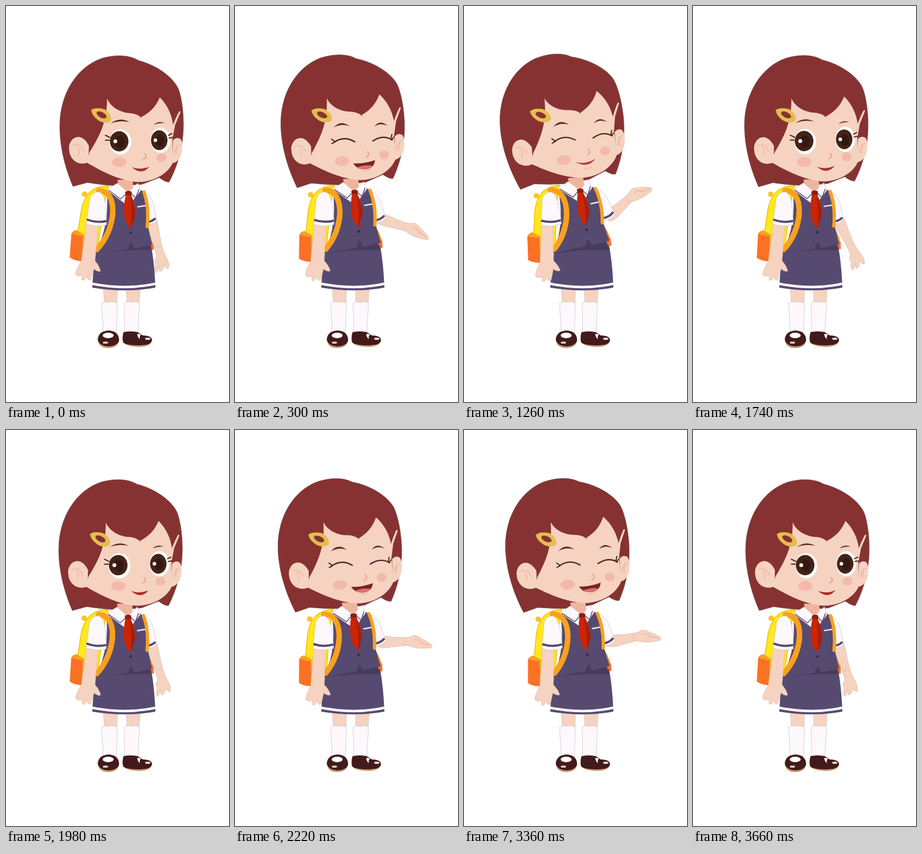
Write an HTML page that moves like this. It is 406 px wide and 720 px high and loops after 3.72 s.

```html
<!DOCTYPE html>
<html lang="en">
<head>
<meta charset="utf-8">
<title>Schoolgirl</title>
<style>
html, body { margin: 0; width: 100%; height: 100%; overflow: hidden; background: #fff; }
svg { display: block; width: 406px; height: 720px; }
.skin { fill: #f5d3c0; }
.limb { stroke: #d3b6a6; stroke-width: .6; }
.hair { fill: #873232; }
.navy { fill: #564a70; }
.white { fill: #fcf8fb; stroke: #c4bec6; stroke-width: .7; }
.line { fill: none; stroke-linecap: round; stroke-linejoin: round; }
.fold { stroke: #eeb5a1; stroke-width: 1.5; }
.lash { stroke: #4a241d; stroke-width: 2; }
.lid { stroke: #4a241d; stroke-width: 2.4; }
.trim { stroke: #564a70; stroke-width: 4; stroke-linecap: butt; }
</style>
</head>
<body>
<svg viewBox="0 0 406 720">
  <g class="head">
    <path class="hair" stroke="#6b4a45" stroke-width=".8" d="M122 328C112 305 97 262 98 215C99 158 130 110 175 95C200 88 225 89 241 99C272 107 302 127 313 149C318 160 323 185 323 215C323 250 315 286 297 320Q291 321 279 312L248 324L205 327Q178 326 148 321Z"/>
  </g>

  <g id="legs">
    <path class="skin limb" d="M177 510H203L202 542H179ZM219 510H245L242 542H220Z"/>
    <path class="white" d="M174 540Q180 536 185 539Q194 536 203 540L201 594Q190 598 177 594ZM215 540Q222 536 228 539Q236 536 243 540L240 594Q228 598 216 594Z"/>
    <path fill="#c79a70" d="M168 609Q169 622 187 622Q204 621 206 608ZM213 610Q216 619 244 620Q264 619 266 608Z"/>
    <path fill="#431a1b" d="M167 607Q168 591 187 590Q205 591 206 607Q204 618 187 619Q170 618 167 607ZM214 593Q227 590 240 593L249 599Q265 599 266 607Q265 617 244 617Q217 617 213 611Q211 602 214 593Z"/>
    <ellipse fill="#fff" cx="186" cy="599" rx="10" ry="5"/>
    <ellipse fill="#d8c9c5" cx="181" cy="612" rx="5" ry="2"/>
    <path fill="#fff" d="M239 596L246 597Q242 601 244 606Q239 602 239 596Z"/>
    <ellipse fill="#e9dfdc" cx="258" cy="605" rx="5" ry="2"/>
  </g>

  <g class="side">
    <circle cx="143" cy="342" r="5" fill="#f9c720"/>
    <path fill="#ffe81d" stroke="#f5b91c" stroke-width="1.5" d="M187 327C158 327 143 341 137 372L130 416L138 464H163L182 342Z"/>
    <path fill="#d5b024" d="M160 395L162 463Q148 467 134 463L143 415Z"/>
    <path fill="#fb7124" d="M127 408L141 415L137 464Q124 463 116 457L119 414Q122 409 127 408Z"/>
    <path fill="#f9a11f" d="M128 407L141 415L138 419L120 414Z"/>
  </g>

  <g class="body">
    <path fill="#f6911f" d="M254 398Q270 420 269 443L256 446Z"/>
    <path fill="#fb7124" d="M263 426L269 430V443H262Z"/>
    <g id="upper">
      <g id="fore">
        <path class="skin limb" d="M-8 -9Q5 -11 24 -8L56 -6V7L20 10Q2 13 -8 8Z"/>
        <path id="restHand" class="skin limb" d="M48 -6L66 -8Q86 -13 91 -7Q91 -3 83 -1Q96 5 92 10L82 8Q95 14 92 18Q84 18 78 13Q70 16 65 8L48 7Z"/>
        <g id="palm">
          <path class="skin limb" d="M-6 -6Q2 -7 7 -12Q16 -14 23 -9Q34 -7 42 -2Q46 3 40 5L22 9Q6 10 -6 7Z"/>
          <path class="line fold" d="M10 -5Q19 -7 25 -2M23 -1L39 0"/>
        </g>
      </g>
      <path class="white" d="M242 336Q261 338 268 358L274 391Q264 400 249 397L242 366Z"/>
      <path class="line trim" d="M249 393Q264 394 272 386"/>
    </g>
  </g>

  <path class="navy" d="M166 440L264 435Q270 465 272 512Q217 522 157 512Q159 470 166 440Z"/>
  <path class="line" stroke="#fcf8fb" stroke-width="4.5" d="M157 505Q217 517 272 505"/>
  <path fill="#463d5e" d="M164 444L205 424H258L265 444Q215 442 164 450Z"/>

  <g class="body">
    <path fill="#efb59c" d="M203 316H231V336L222 345L206 335Z"/>
    <path class="navy" d="M183 335L207 331L222 352L238 331L252 338Q260 368 258 398L266 434L234 441L228 428L221 442Q190 445 161 452L175 420Q188 380 183 335Z"/>
    <path class="white" d="M183 334L203 322L222 339L240 322L245 336L223 364Z"/>
    <path class="line" stroke="#564a70" stroke-width="1.5" d="M187 335L209 351L217 343M229 342L236 349L242 334"/>
    <path fill="#8d1c12" d="M217 338Q223 334 229 338L228 348H218Z"/>
    <path fill="#c92508" d="M218 344H228Q235 360 236 378L227 405Q216 394 215 378Q214 360 218 344Z"/>
    <path fill="#a91c0a" d="M226 346Q237 368 235 382L227 405Q231 370 226 346Z"/>
    <circle cx="227" cy="412" r="2.5" fill="#3e2930"/>
    <path class="line" stroke="#eee8ef" stroke-width="2.5" d="M240 365L254 363"/>
    <path class="line" stroke="#f9a11f" stroke-width="6" d="M251 338Q261 365 257 401"/>
    <path class="line" stroke="#f9a11f" stroke-width="10" stroke-linecap="butt" d="M169 336C205 335 202 405 165 443"/>
  </g>

  <g class="side">
    <path class="skin limb" d="M147 394L168 397L162 463Q171 474 172 482Q167 484 160 478L154 497Q149 502 147 491Q143 501 138 498L138 490Q130 493 126 487Q130 473 137 464Z"/>
    <path class="white" d="M153 350Q158 337 170 338Q184 343 183 398Q165 403 146 396Z"/>
    <path class="line trim" d="M147 388Q165 395 183 391"/>
  </g>

  <g class="head">
    <path class="skin" d="M184 168C190 183 207 194 228 195Q247 198 249 210L246 202C262 194 273 183 280 166C294 180 302 198 304 216Q309 203 315 192Q319 190 317 195L308 216L303 242L304 284C296 304 270 320 240 320C205 318 170 298 146 284L152 266C168 240 184 214 184 168Z"/>
    <path class="skin" d="M150 284Q137 290 125 282Q113 272 115 254Q119 238 133 238Q143 239 151 254ZM304 244Q311 237 318 242Q323 250 320 266Q316 283 303 286Z"/>
    <path class="line fold" d="M122 253Q136 248 141 264M130 256Q136 265 131 272M318 252Q309 252 307 268M313 256Q309 262 311 269"/>
    <path fill="#e3bd51" d="M155 189Q164 183 180 188Q194 198 191 209Q182 216 168 208Q156 199 155 189Z"/>
    <ellipse class="hair" cx="174" cy="198" rx="10" ry="5" transform="rotate(28 174 198)"/>
    <ellipse fill="#f3baa9" cx="206" cy="284" rx="13" ry="9"/>
    <ellipse fill="#f3baa9" cx="283" cy="276" rx="9" ry="8"/>
    <path class="line" stroke="#eaa08c" stroke-width="2" d="M253 269Q259 275 250 279"/>

    <g id="open">
      <path fill="#5d2a22" d="M191 213Q207 201 225 211Q208 207 191 213ZM269 216Q278 208 289 213Q279 212 269 216Z"/>
      <ellipse fill="#fff" cx="208" cy="247" rx="20" ry="23"/>
      <ellipse fill="#fff" cx="281" cy="244" rx="18" ry="23"/>
      <ellipse fill="#432318" cx="206" cy="246" rx="17" ry="18.5"/>
      <ellipse fill="#432318" cx="279" cy="244" rx="15" ry="18"/>
      <ellipse fill="#35180f" cx="207" cy="247" rx="9" ry="11"/>
      <ellipse fill="#35180f" cx="280" cy="245" rx="8" ry="11"/>
      <circle fill="#fff" cx="199" cy="246" r="3.5"/>
      <circle fill="#fff" cx="272" cy="244" r="3.2"/>
      <path class="line lash" d="M181 235L189 239M181 244L188 244M296 235L302 232M297 240L303 239"/>
      <path fill="#a92e2b" d="M229 293Q245 299 261 292Q247 309 229 293Z"/>
    </g>
    <g id="closed">
      <path fill="#5d2a22" d="M194 222Q207 208 223 221Q208 215 194 222ZM268 224Q279 211 292 224Q280 217 268 224Z"/>
      <path class="line lid" d="M193 249Q212 237 231 250M264 250Q283 239 299 250"/>
      <path class="line lash" d="M189 243L195 248M189 251L194 249M297 247L299 240M298 250L302 245"/>
      <path class="line fold" d="M242 303Q248 306 256 302"/>
      <path id="smile" fill="#b93f3a" d="M227 290Q246 297 264 288Q249 305 227 290Z"/>
      <g id="talk">
        <path fill="#7d2421" d="M226 289Q246 291 266 285Q264 300 247 301Q232 300 226 289Z"/>
        <path fill="#d9736c" d="M232 297Q246 292 261 295Q256 301 247 301Q238 301 232 297Z"/>
      </g>
    </g>
  </g>
</svg>
<script>
const STEP = 60, LOOP = 3720, CYCLE = LOOP / 2;
const $ = id => document.getElementById(id);
const all = name => document.querySelectorAll(name);
const heads = all('.head'), bodies = all('.body'), sides = all('.side');

// time in a cycle -> how far the greeting is raised
const RAISE = [[0, 0], [60, .01], [120, .06], [180, .14], [240, .28], [300, .45], [360, .61], [420, .78],
  [480, .92], [540, 1], [1320, 1], [1380, .96], [1440, .85], [1560, .54], [1680, .23], [1740, .13], [1800, .065], [1860, 0]];
// raise -> forearm angle in degrees
const FOREARM = [[0, 75], [.065, 73], [.13, 64], [.45, 18], [.61, -1], [1, -41]];

function lerp(keys, x) {
  const i = Math.max(1, keys.findIndex(k => k[0] >= x));
  const [x0, y0] = keys[i - 1], [x1, y1] = keys[i];
  return y0 + (y1 - y0) * (x - x0) / (x1 - x0);
}
const move = (el, value) => el.setAttribute('transform', value);
const show = (el, on) => el.setAttribute('visibility', on ? 'inherit' : 'hidden');

function draw(time) {
  const p = Math.floor(time % LOOP / STEP) * STEP % CYCLE;
  const k = lerp(RAISE, p);
  const lean = -3.5 * k, lift = -9 * k;
  const angle = lerp(FOREARM, k);

  heads.forEach(el => move(el, `translate(${-20 * k} ${-4 * k}) rotate(${-6.5 * k} 205 325)`));
  bodies.forEach(el => move(el,
    `translate(${225 - k} ${440 - 5 * k}) rotate(${lean}) skewX(${2.5 * k}) translate(-225 -440)`));
  sides.forEach(el => move(el, `rotate(${-6 * k} 165 452)`));
  move($('upper'), `rotate(${lift} 252 342)`);
  move($('fore'), `translate(265 391) rotate(${angle - lean - lift})`);
  move($('palm'), `translate(50 0) rotate(${3 + 15 * k})`);

  const greeting = k > .3;
  const talking = p % 540 >= 270;
  show($('restHand'), !greeting);
  show($('palm'), greeting);
  show($('open'), !greeting);
  show($('closed'), greeting);
  show($('talk'), talking);
  show($('smile'), !talking);
}

const start = performance.now();
function tick() {
  draw(performance.now() - start);
  requestAnimationFrame(tick);
}
tick();
</script>
</body>
</html>
```
